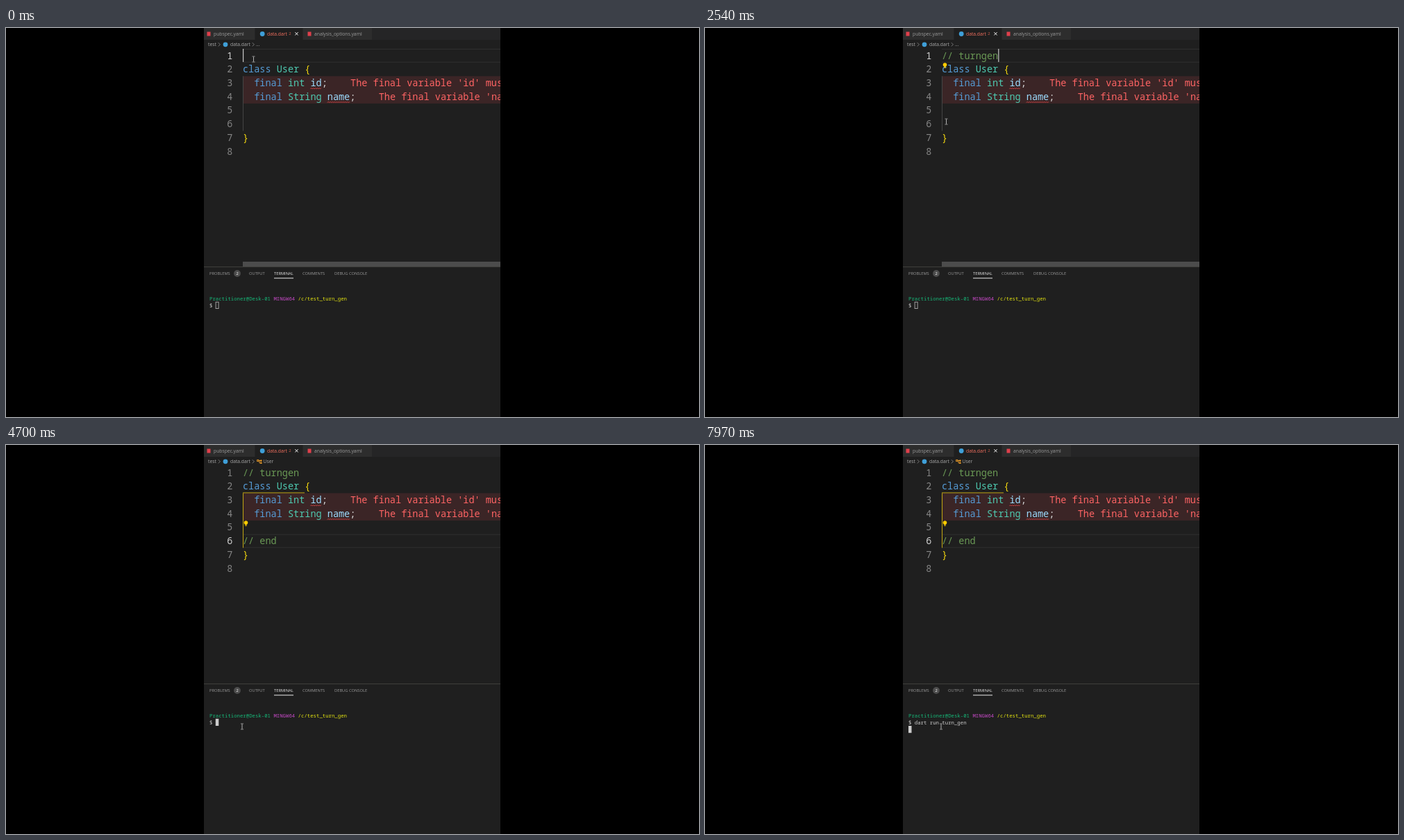
Animation of 998x561 px, one loop 8000 ms. Source, as an HTML page with a canvas:

```html
<!DOCTYPE html>
<html lang="en">
<head>
<meta charset="utf-8">
<title>Code editor</title>
<style>
  html, body { margin: 0; width: 100%; height: 100%; overflow: hidden; background: #000; }
  canvas { display: block; }
</style>
</head>
<body>
<canvas id="stage" width="998" height="561"></canvas>
<script>
const ctx = document.getElementById('stage').getContext('2d');
const LOOP = 8000;
const LEFT = 285, RIGHT = 712, CODE_X = 341, CHAR = 8.12, ROW = 19.72, TERM_X = 293, TERM_CHAR = 4.4;
const MONO = '"Noto Sans Mono", "DejaVu Sans Mono", monospace';
const CODE = `13.53px ${MONO}`, TERM = `7.33px ${MONO}`;
const UI = '6.75px "Open Sans", "Noto Sans", sans-serif';
const CAPS = '5.75px "Open Sans", "Noto Sans", sans-serif';
const BG = '#1f1f1f', KEYWORD = '#569cd6', TYPE = '#4ec9b0', NAME = '#9cdcfe', PLAIN = '#d4d4d4';
const GOLD = '#f5d90f', COMMENT = '#6a9955', ERROR = '#ff6464', DART = '#3f9fd8', YAML = '#e0404c';

// Key press times
const keys = {
  start: [200, 340, 520, 800, 890, 970, 1050, 1140, 1240, 1450],
  end: [2880, 2980, 3120, 3280, 3400, 3530],
  command: [5450, 5600, 5690, 5780, 5870, 5980, 6080, 6180,
            6420, 6500, 6590, 6670, 6750, 6840, 6920, 7000, 7090]
};
const LINE_CLICK = 2560, GHOST_ON = 3800, TERM_CLICK = 4500, ENTER = 7420;

// Pointer path: time, x, y
const pointerPath = [
  [0, 356.5, 45], [2240, 356.5, 45], [2500, 347.5, 135], [3680, 347.5, 135],
  [3860, 352, 465], [3960, 354, 540], [4170, 351, 391], [4380, 340, 406], [LOOP, 340, 406]
];

const rowTop = n => 30 + ROW * (n - 1);
const codeX = col => CODE_X + CHAR * col;
const pressed = (list, t) => list.filter(k => k <= t).length;

function rect(x, y, w, h, color) {
  ctx.fillStyle = color;
  ctx.fillRect(x, y, w, h);
}

function text(str, x, y, font, color) {
  ctx.font = font;
  ctx.fillStyle = color;
  ctx.fillText(str, x, y);
}

function disc(x, y, r, color) {
  ctx.fillStyle = color;
  ctx.beginPath();
  ctx.arc(x, y, r, 0, 7);
  ctx.fill();
}

function path(points, color, width = 1) {
  ctx.strokeStyle = color;
  ctx.lineWidth = width;
  ctx.beginPath();
  points.forEach(([x, y]) => ctx.lineTo(x, y));
  ctx.stroke();
}

function frame(x, y, w, h, color, width = 1) {
  ctx.strokeStyle = color;
  ctx.lineWidth = width;
  ctx.strokeRect(x, y, w, h);
}

// Writes [text, color] pieces on an editor row, starting at a column
function code(row, col, ...pieces) {
  for (const [str, color, style = ''] of pieces) {
    text(str, codeX(col), rowTop(row) + 14.5, style + CODE, color);
    col += str.length;
  }
}

function squiggle(row, col, length) {
  const points = [];
  for (let x = 0; x <= length * CHAR; x += 1.4)
    points.push([codeX(col) + x, rowTop(row) + 17.8 + (points.length % 2 ? -0.7 : 0.7)]);
  path(points, '#f14c4c', 0.8);
}

function chevron(x) {
  path([[x - 1.2, 21.2], [x + 1.4, 23.8], [x - 1.2, 26.4]], '#a0a0a0', 0.7);
}

function bulb(x, y) {
  disc(x, y - 1, 2.8, '#ffcc00');
  rect(x - 1.4, y + 1, 2.8, 1.2, '#ffcc00');
  rect(x - 1.4, y + 2.7, 2.8, 1, '#ffcc00');
}

// A blinking caret stays lit for one half-period after the last action
function lit(t, actions, half) {
  const last = Math.max(0, ...actions.filter(a => a <= t));
  return Math.floor((t - last) / half) % 2 === 0;
}

function drawTabs(t) {
  rect(LEFT, 0, RIGHT - LEFT, 17, '#252526');
  rect(LEFT, 0, 73, 17, '#2d2d2d');
  rect(359, 0, 68, 17, BG);
  rect(428, 0, 99, 17, '#2d2d2d');
  rect(289.5, 5.5, 5, 6, YAML);
  text('pubspec.yaml', 299, 10.8, UI, '#9a9a9a');
  disc(369.2, 8.5, 3.4, DART);
  text('data.dart', 376, 10.8, UI, '#f2705f');
  text('2', 407.2, 10.4, '6px "Open Sans", "Noto Sans", sans-serif', '#d0604f');
  path([[416.4, 6.2], [420.6, 10.4]], '#fff');
  path([[420.6, 6.2], [416.4, 10.4]], '#fff');
  rect(434.5, 5.5, 5, 6, YAML);
  text('analysis_options.yaml', 444, 10.8, UI, '#9a9a9a');

  text('test', 291, 26.1, UI, '#a9a9a9');
  chevron(307);
  disc(316, 23.8, 3.4, DART);
  text('data.dart', 323, 26.1, UI, '#a9a9a9');
  chevron(356);
  if (t < LINE_CLICK) {
    text('...', 360, 26.1, UI, '#a9a9a9');
  } else {
    frame(361.7, 21.4, 2.2, 2.2, '#ee9d28', 0.9);
    path([[364, 22.5], [368, 22.5]], '#ee9d28', 0.9);
    path([[365, 22.5], [365, 26], [366.5, 26]], '#ee9d28', 0.9);
    rect(366.3, 21.5, 2.2, 2.2, '#ee9d28');
    rect(366.3, 24.8, 2.2, 2.2, '#ee9d28');
    text('User', 370.5, 26.1, UI, '#a9a9a9');
  }
}

function drawEditor(t) {
  const inClass = t >= LINE_CLICK, focused = t < TERM_CLICK;
  const active = inClass ? 6 : 1;
  const startCount = pressed(keys.start, t), endCount = pressed(keys.end, t);

  rect(CODE_X, rowTop(active), RIGHT - CODE_X, 1, '#303030');
  rect(CODE_X, rowTop(active) + ROW - 1, RIGHT - CODE_X, 1, '#303030');
  rect(CODE_X, rowTop(3), RIGHT - CODE_X, ROW * 2, '#3b2526');

  const guide = inClass ? '#c2a612' : '#454545';
  rect(CODE_X, rowTop(3), 1, ROW * 4, guide);
  if (inClass) rect(CODE_X, rowTop(3) - 1, 89, 1, guide);

  for (let n = 1; n <= 8; n++)
    text(n, 318.3, rowTop(n) + 14.5, CODE, n === active ? '#d0d0d0' : '#858585');

  if (inClass && focused) {
    frame(codeX(11) + 0.2, rowTop(2) + 1.5, 7.6, 17, '#888', 0.9);
    frame(CODE_X + 0.5, rowTop(7) + 1.5, 7.6, 17, '#888', 0.9);
  }

  code(1, 0, ['// turngen'.slice(0, startCount), COMMENT]);
  code(2, 0, ['class', KEYWORD], [' User', TYPE], [' {', GOLD]);
  code(3, 2, ['final', KEYWORD], [' int', TYPE], [' id', NAME], [';', PLAIN]);
  code(4, 2, ['final', KEYWORD], [' String', TYPE], [' name', NAME], [';', PLAIN]);
  code(3, 19.1, ["The final variable 'id' must be", ERROR]);
  code(4, 24.1, ["The final variable 'name' must", ERROR]);
  squiggle(3, 12, 2);
  squiggle(4, 15, 4);
  code(6, 0, ['// end'.slice(0, endCount), COMMENT]);
  if (t >= GHOST_ON && focused) code(6, 6, [' of turngen', '#707070', 'italic ']);
  code(7, 0, ['}', GOLD]);

  if (t >= 1700 && t < LINE_CLICK) bulb(345.5, 54);
  if (t >= GHOST_ON) bulb(345.5, 113);

  if (focused && lit(t, [...keys.start, LINE_CLICK, ...keys.end], 500))
    rect(codeX(inClass ? endCount : startCount), rowTop(active), 1.2, ROW - 0.7, '#c8c8c8');

  ctx.globalAlpha = Math.min(1, Math.max(0, (4650 - t) / 400));
  rect(CODE_X, 337, RIGHT - CODE_X, 7, '#4c4c4c');
  ctx.globalAlpha = 1;
}

function drawPanel(t) {
  rect(LEFT, 344, RIGHT - LEFT, 1, '#40403c');
  const titles = [['PROBLEMS', 293], ['OUTPUT', 350], ['TERMINAL', 386], ['COMMENTS', 427], ['DEBUG CONSOLE', 473]];
  for (const [title, x] of titles)
    text(title, x, 356.2, CAPS, title === 'TERMINAL' ? '#e7e7e7' : '#9a9a9a');
  rect(386, 360.3, 28, 1, '#e7e7e7');
  disc(333, 354, 4.9, '#4d4d4d');
  text('2', 331.4, 356.1, CAPS, '#fff');

  const prompt = [['Practitioner@Desk-01', 0, '#16b878'], ['MINGW64', 21, '#c84ac8'], ['/c/test_turn_gen', 29, '#e5e510']];
  for (const [str, col, color] of prompt) text(str, TERM_X + col * TERM_CHAR, 392.6, TERM, color);

  const count = pressed(keys.command, t);
  text('$ ' + 'dart run turn_gen'.slice(0, count), TERM_X, 402.8, TERM, '#cccccc');

  const entered = t >= ENTER;
  const x = TERM_X + (entered ? 0 : 2 + count) * TERM_CHAR, y = entered ? 405 : 394.8;
  if (t < TERM_CLICK) frame(x + 0.3, y + 0.4, 4, 9.4, '#bdbdbd', 0.8);
  else if (lit(t, [TERM_CLICK, ...keys.command, ENTER], 600)) rect(x, y, 4.5, 10.2, '#cccccc');
}

function drawPointer(t) {
  const i = pointerPath.findIndex(p => p[0] > t);
  const [t0, x0, y0] = pointerPath[i - 1], [t1, x1, y1] = pointerPath[i];
  const p = (t - t0) / (t1 - t0), ease = p * p * (3 - 2 * p);
  const x = x0 + (x1 - x0) * ease, y = y0 + (y1 - y0) * ease;
  path([[x, y - 3.5], [x, y + 3.5]], '#c4c4c4', 0.9);
  for (const end of [-4, 4]) path([[x - 2, y + end], [x + 2, y + end]], '#b0b0b0', 0.8);
}

function draw(now) {
  const t = now % LOOP;
  rect(0, 0, 998, 561, '#000');
  ctx.save();
  ctx.beginPath();
  ctx.rect(LEFT, 0, RIGHT - LEFT, 561);
  ctx.clip();
  rect(LEFT, 0, RIGHT - LEFT, 561, BG);
  drawTabs(t);
  drawEditor(t);
  drawPanel(t);
  drawPointer(t);
  ctx.restore();
}

let begin;
function tick(now) {
  begin ??= now;
  draw(Math.max(0, now - begin));
  requestAnimationFrame(tick);
}
draw(0);
requestAnimationFrame(tick);
</script>
</body>
</html>
```
